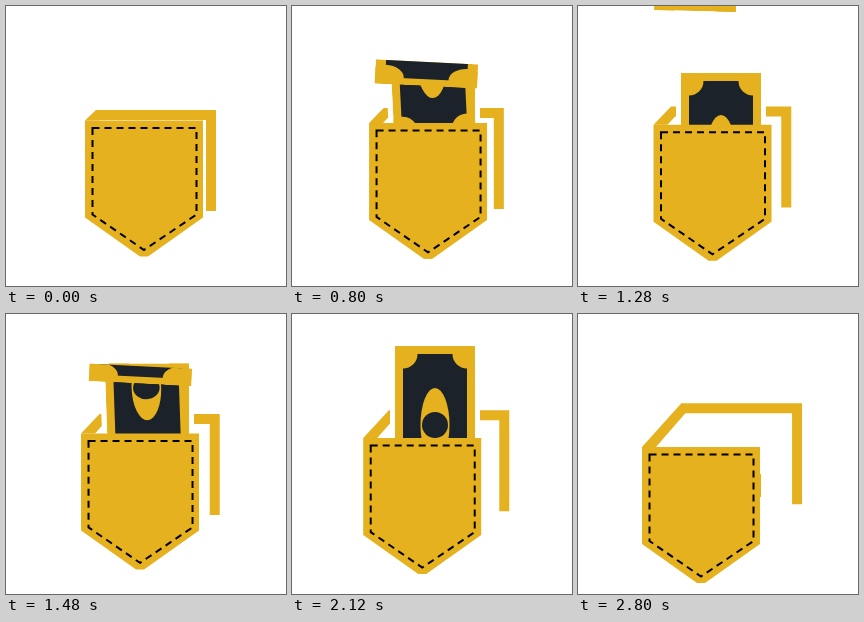
An HTML page with a canvas that plays this animation: 280 px wide and 280 px high, repeating every 2.84 s.

```html
<!DOCTYPE html>
<html lang="en">
<head>
<meta charset="utf-8">
<title>Pocket money</title>
<style>
html, body { margin: 0; width: 100%; height: 100%; overflow: hidden; background: #fff; }
canvas { display: block; }
</style>
</head>
<body>
<canvas width="280" height="280"></canvas>
<script>
const ctx = document.querySelector('canvas').getContext('2d');
const YELLOW = '#e5b11f', DARK = '#1b2229';
const LOOP = 2840, BILL_H = 158, FALL_SCALE = 0.88;
const drops = [0, 620, 1240];

// Key poses as [time, value], joined linearly
const opening = [[0, 0], [480, 1.6], [800, 2.4], [1160, 4.2], [1280, 4.3], [1720, 5.6],
  [2120, 9.6], [2300, 9.6], [2640, 27.5], [2720, 27.5], [2800, 18.5], [2840, 0]];
const stackTop = [[0, 170], [480, 110], [620, 67], [1300, 67], [1720, 26], [2120, 32],
  [2300, 24], [2560, 160]];
const fall = {
  x: [[40, 117], [180, 143], [480, 142]],
  bottom: [[0, -30], [40, 5], [180, 129], [480, 200], [620, 275]],
  tilt: [[40, 0.025], [180, -0.05], [480, 0.025]],
  fold: [[40, -66], [180, 54], [400, 40]],
  flap: [[180, 24], [400, 0]]
};

function at(keys, t) {
  if (t <= keys[0][0]) return keys[0][1];
  for (let i = 1; i < keys.length; i++) {
    const [t0, a] = keys[i - 1], [t1, b] = keys[i];
    if (t <= t1) return a + (b - a) * (t - t0) / (t1 - t0);
  }
  return keys[keys.length - 1][1];
}

function polygon(points, color) {
  ctx.beginPath();
  points.forEach(([x, y]) => ctx.lineTo(x, y));
  ctx.closePath();
  ctx.fillStyle = color;
  ctx.fill();
}

function disc(x, y, rx, ry, color) {
  ctx.beginPath();
  ctx.ellipse(x, y, rx, ry, 0, 0, 7);
  ctx.fillStyle = color;
  ctx.fill();
}

function clipRect(x, y, w, h) {
  ctx.beginPath();
  ctx.rect(x, y, w, h);
  ctx.clip();
}

// Bill with its bottom centre at the origin
function bill(halo) {
  if (halo) {
    ctx.strokeStyle = '#fff';
    ctx.lineWidth = 10;
    ctx.strokeRect(-40, -BILL_H, 80, BILL_H);
    return;
  }
  clipRect(-40, -BILL_H, 80, BILL_H);
  ctx.fillStyle = YELLOW;
  ctx.fillRect(-40, -BILL_H, 80, BILL_H);
  ctx.fillStyle = DARK;
  ctx.fillRect(-32, 8 - BILL_H, 64, BILL_H - 16);
  for (const x of [-32, 32])
    for (const y of [-8, 8 - BILL_H]) disc(x, y, 14.5, 14.5, YELLOW);
  disc(0, -BILL_H / 2, 14.5, 37, YELLOW);
  disc(0, -BILL_H / 2, 13, 13, DARK);
}

function stackedBill(t, halo) {
  ctx.save();
  ctx.translate(143, at(stackTop, t) + BILL_H);
  bill(halo);
  ctx.restore();
}

function fallingBill(phase, halo) {
  if (phase <= 0 || phase > 620) return;
  const x = at(fall.x, phase), fold = at(fall.fold, phase), flap = at(fall.flap, phase);
  ctx.save();
  clipRect(0, fold + 4, 280, 280);
  ctx.translate(x, at(fall.bottom, phase));
  ctx.rotate(at(fall.tilt, phase));
  ctx.scale(1.02, FALL_SCALE);
  bill(halo);
  ctx.restore();
  if (halo || flap <= 0) return;
  // The far end curls over towards the viewer
  ctx.save();
  ctx.translate(x - 8, fold + 2);
  ctx.rotate(0.05);
  clipRect(-60, 0, 120, flap);
  ctx.translate(0, flap);
  ctx.scale(1.28, 0.85);
  bill(false);
  ctx.restore();
}

function back(open, left, top) {
  const x = 90 + 0.72 * open, y = 104 - 0.8 * open;
  const right = 210 + 0.76 * open, end = 205 - 0.8 * open;
  polygon([[left, top], [x, y], [right, y], [right, end], [right - 10, end],
    [right - 10, y + 10], [x + 4, y + 10], [left + 14, top]], YELLOW);
}

function front(left, top) {
  ctx.save();
  ctx.translate(left, top);
  polygon([[0, 0], [118, 0], [118, 97], [63, 136], [55, 136], [0, 97]], YELLOW);
  ctx.beginPath();
  [[7.5, 7.5], [111.5, 7.5], [111.5, 94], [59, 129.5], [7.5, 94]]
    .forEach(([x, y]) => ctx.lineTo(x, y));
  ctx.closePath();
  ctx.setLineDash([7, 5]);
  ctx.strokeStyle = '#000';
  ctx.lineWidth = 2;
  ctx.stroke();
  ctx.restore();
}

function draw(now) {
  let t = Math.floor(now % LOOP / 40) * 40;
  if (t < 80) t = 0;
  const open = at(opening, t), left = 79 - 0.81 * open, top = 114.5 + open;
  ctx.fillStyle = '#fff';
  ctx.fillRect(0, 0, 280, 280);
  back(open, left, top);
  ctx.save();
  clipRect(0, 0, 280, top + 50);
  for (const halo of [true, false]) {
    stackedBill(t, halo);
    drops.forEach(start => fallingBill(t - start, halo));
  }
  ctx.restore();
  front(left, top);
}

const began = performance.now();
function tick() {
  draw(performance.now() - began);
  requestAnimationFrame(tick);
}
tick();
</script>
</body>
</html>
```
